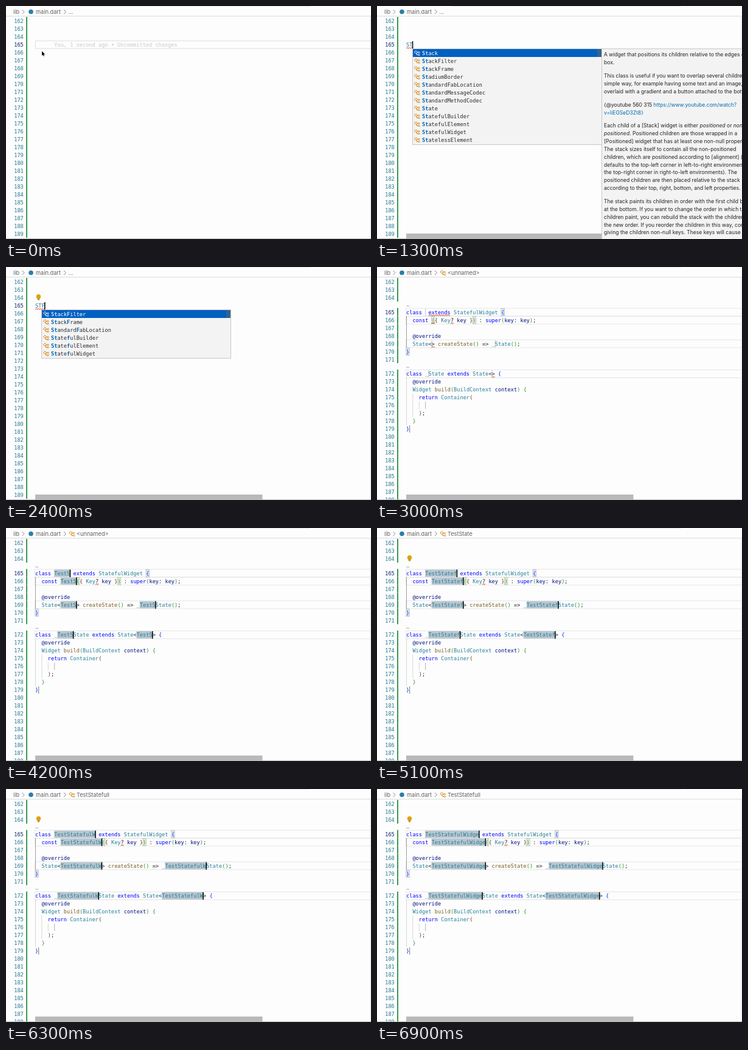
Write an HTML page with a canvas that moves like this. It is 600 px wide and 384 px high and loops after 7 s.

```html
<!DOCTYPE html>
<html lang="en">
<head>
<meta charset="utf-8">
<title>Stateful widget snippet</title>
<style>
html, body { margin: 0; width: 100%; height: 100%; overflow: hidden; background: #fdfdfd; }
canvas { display: block; }
</style>
</head>
<body>
<canvas id="stage" width="600" height="384"></canvas>
<script>
const ctx = document.getElementById('stage').getContext('2d');
const LOOP = 7000, LEFT = 48, CHAR = 5.207, ROW = 13, LENS = 10.5;
const MONO = '8.65px "DejaVu Sans Mono", monospace';
const UI = '9.2px Inter, sans-serif';
const DOC = '8.55px Inter, sans-serif';
const TYPE = '#267f99', RED = '#e51400', BORDER = '#e6e6e6';
const BRACKETS = ['#0431fa', '#319331', '#7b3814'];

// Moments in ms
const LIST = 700, DOCS = 1200, BULB = 1500, INSERT = 2600, OUTLINE = 2900;
const QUERY = [[500, 'S'], [1000, 'ST'], [2000, 'STF']];
// '<' deletes the previous letter
const KEYS = 'TestStatefull<Widge';
const KEY_TIMES = [3400, 3600, 3800, 3900, 4100, 4300, 4500, 4600, 4700, 4900,
  5200, 5400, 5700, 6000, 6200, 6400, 6500, 6700, 6850];
const CRUMBS = [[OUTLINE, '<unnamed>'], [4900, 'TestState'], [5900, 'TestStatefull']];

const CODE = `class $ extends StatefulWidget {
  const $({ Key? key }) : super(key: key);

  @override
  State<$> createState() => _$State();
}

class _$State extends State<$> {
  @override
  Widget build(BuildContext context) {
    return Container(

    );
  }
}`.split('\n');

const ITEMS = `Stack StackFilter StackFrame StadiumBorder StandardFabLocation
StandardMessageCodec StandardMethodCodec State StatefulBuilder StatefulElement
StatefulWidget StatelessElement`.split(/\s+/);

// *italic*, |link|
const PARAGRAPHS = `A widget that positions its children relative to the edges of its
box.

This class is useful if you want to overlap several children in a
simple way, for example having some text and an image,
overlaid with a gradient and a button attached to the bottom.

{@youtube 560 315 |https://www.youtube.com/watch?|
|v=liEGSeD3Zt8}|

Each child of a [Stack] widget is either *positioned* or *non-*
*positioned*. Positioned children are those wrapped in a
[Positioned] widget that has at least one non-null property.
The stack sizes itself to contain all the non-positioned
children, which are positioned according to [alignment] (which
defaults to the top-left corner in left-to-right environments and
the top-right corner in right-to-left environments). The
positioned children are then placed relative to the stack
according to their top, right, bottom, and left properties.

The stack paints its children in order with the first child being
at the bottom. If you want to change the order in which the
children paint, you can rebuild the stack with the children in
the new order. If you reorder the children in this way, consider
giving the children non-null keys. These keys will cause`.split('\n\n').map(p => p.split('\n'));

const latest = (steps, t) => steps.reduce((value, [at, v]) => t >= at ? v : value, '');
const colX = col => LEFT + col * CHAR;

function rect(x, y, w, h, color) {
  ctx.fillStyle = color;
  ctx.fillRect(x, y, w, h);
}

function frame(x, y, w, h, color) {
  ctx.strokeStyle = color;
  ctx.lineWidth = 1;
  ctx.strokeRect(x, y, w, h);
}

function text(str, x, y, color, font = MONO) {
  ctx.font = font;
  ctx.fillStyle = color;
  ctx.fillText(str, x, y + 3.1);
}

function line(points, color, width = 1) {
  ctx.beginPath();
  points.forEach(([x, y]) => ctx.lineTo(x, y));
  ctx.strokeStyle = color;
  ctx.lineWidth = width;
  ctx.stroke();
}

function disc(x, y, r, color) {
  ctx.beginPath();
  ctx.arc(x, y, r, 0, 7);
  ctx.fillStyle = color;
  ctx.fill();
}

function squiggle(x, y, w) {
  const points = [];
  for (let i = 0; i <= w; i += 1.7) points.push([x + i, y + 5.3 + (points.length % 2 ? -0.8 : 0.8)]);
  line(points, RED, 0.9);
}

function chevron(x) {
  line([[x, 6], [x + 3.5, 9.5], [x, 13]], '#767676', 0.9);
}

function diamond(x, y, r, color) {
  line([[x - r, y], [x, y - r], [x + r, y], [x, y + r], [x - r, y]], color, 1);
}

function classIcon(x, y, color = '#d67e00') {
  diamond(x + 3, y - 1.5, 2.5, color);
  diamond(x + 8, y - 1, 1.4, color);
  diamond(x + 8, y + 3, 1.4, color);
  line([[x + 5, y - 1], [x + 7, y - 1]], color);
  line([[x + 4.5, y], [x + 4.5, y + 3], [x + 7, y + 3]], color);
}

function bulb() {
  disc(53.5, 48.8, 3.7, '#dda20d');
  rect(51.8, 51, 3.4, 3.6, '#c99413');
}

function caret(x, y) {
  rect(x - 0.6, y - 6, 1.5, 12.5, '#000');
}

function pointer(x, y) {
  ctx.beginPath();
  [[0, 0], [0, 7.2], [1.7, 5.7], [2.8, 8.2], [4, 7.7], [2.9, 5.2], [5.2, 5.2]]
    .forEach(([dx, dy]) => ctx.lineTo(x + dx, y + dy));
  ctx.closePath();
  ctx.fillStyle = '#000';
  ctx.fill();
}

function breadcrumbs(t) {
  rect(122, 0, 378, 1, '#e9e9e9');
  rect(0, 16, 600, 1, '#e2e2e2');
  rect(0, 17, 600, 1, '#f3f3f3');
  text('lib', 12, 9.5, '#616161', UI);
  chevron(26.5);
  disc(41, 9.5, 3.8, '#2a7ea8');
  text('main.dart', 49, 9.5, '#616161', UI);
  chevron(95);
  const crumb = latest(CRUMBS, t);
  if (crumb) {
    classIcon(103.5, 9.5);
    text(crumb, 116, 9.5, '#616161', UI);
  } else {
    text('...', 102.5, 9.5, '#616161', UI);
  }
}

function rowY(n, inserted) {
  const lenses = inserted ? (n >= 165) + (n >= 172) : 0;
  return 25 + (n - 162) * ROW + lenses * LENS;
}

function gutter(inserted) {
  for (let n = 162; n < 190; n++) {
    const y = rowY(n, inserted);
    text(n, 13.2, y, n === 165 ? '#0b216f' : '#237893');
    rect(33, y - 7, 2, ROW, '#38994f');
  }
}

function tokenColor(token) {
  if (/^(class|extends|const|return|super)$/.test(token)) return '#0000ff';
  if (/^(createState|build)$/.test(token)) return '#795e26';
  if (/^[A-Z_]/.test(token)) return TYPE;
  return /^[@a-z]/.test(token) ? '#001080' : '#222';
}

function bracketBox(x, y, fill, edge) {
  rect(x, y - 6, CHAR, 12, fill);
  frame(x, y - 6, CHAR, 12, edge);
}

function guide(col, from, to, color) {
  const top = rowY(from, true) - 6.5;
  rect(colX(col), top, 1, rowY(to, true) + 6.5 - top, color);
}

function code(name) {
  [165, 172].forEach(n => text('…', LEFT, rowY(n, true) - 13, '#999'));
  [165, 166, 169, 172].forEach(n => frame(LEFT - 0.5, rowY(n, true) - 6.5, 560, ROW, BORDER));
  guide(0, 166, 169, '#a0a0a0');
  guide(0, 173, 178, '#d6d6d6');
  guide(2, 175, 177, '#d6d6d6');
  guide(4, 176, 176, '#d6d6d6');
  rect(colX(6), rowY(176, true) - 6, 1, 12, '#b0b0b0');

  let depth = 0;
  CODE.forEach((source, i) => {
    const n = 165 + i, y = rowY(n, true), carets = [];
    let col = 0;
    for (const token of source.match(/\$|@?\w+|\s+|[^\w\s$]/g) || []) {
      const x = colX(col);
      if (token === '$') {
        rect(x, y - 6, Math.max(1, name.length * CHAR), 12, '#b9c6d0');
        text(name, x, y, TYPE);
        col += name.length;
        if (name) carets.push(colX(col));
        continue;
      }
      let color = tokenColor(token);
      if (/[)}]/.test(token)) depth--;
      if (/[(){}]/.test(token)) color = BRACKETS[depth % 3];
      if ((n === 165 && token === '{') || n === 170) bracketBox(x, y, '#e6ebf5', '#b9bfcb');
      if (n === 166 && depth === 1 && /[()]/.test(token) && (col < 9 + name.length || col === 21 + name.length))
        bracketBox(x, y, '#e3eee0', '#b9c9b6');
      if (/[({]/.test(token)) depth++;
      text(token, x, y, color);
      col += token.length;
      if (token === '?') squiggle(x, y, CHAR);
      const missing = n === 165 && token === 'extends' || n === 166 && col === 9
        || (n === 169 || n === 172) && token === '>' && source[source.indexOf('>') - 1] === '$' && carets.length === 0;
      if (!name && missing && !(n === 169 && col > 10)) squiggle(x, y, token.length * CHAR);
    }
    carets.forEach(x => caret(x, y));
    if (n === 179) rect(colX(1), y - 6, 1, 12, '#777');
  });
}

// Positions of the query letters within the label, or null
function fuzzy(label, query) {
  const hits = [];
  let from = 0;
  for (const letter of query.toLowerCase()) {
    const at = label.toLowerCase().indexOf(letter, from);
    if (at < 0) return null;
    hits.push(at);
    from = at + 1;
  }
  return hits;
}

function suggestions(query) {
  const found = ITEMS.map(label => ({ label, hits: fuzzy(label, query) })).filter(item => item.hits);
  rect(58, 70.5, 311, found.length * ROW + 2, '#f3f3f3');
  frame(58.5, 70.5, 311, found.length * ROW + 2, '#c8c8c8');
  rect(59, 71, 310, ROW, '#0060c0');
  rect(362, 71, 7, ROW, 'rgba(100,100,100,.5)');
  found.forEach(({ label, hits }, i) => {
    const y = 77.5 + i * ROW, selected = i === 0;
    classIcon(61, y, selected ? '#fff' : '#d67e00');
    [...label].forEach((letter, j) => {
      const hit = hits.includes(j);
      const color = selected ? (hit ? '#bbe1ff' : '#fff') : (hit ? '#0066bf' : '#2b2b2b');
      text(letter, 74 + j * CHAR, y, color, (hit ? 'bold ' : '') + MONO);
    });
  });
}

function docs() {
  rect(369, 70.5, 231, 314, '#f3f3f3');
  frame(369.5, 70.5, 240, 330, '#c8c8c8');
  let y = 80.3;
  for (const lines of PARAGRAPHS) {
    for (const str of lines) {
      let x = 373, italic = false, link = false;
      for (const part of str.split(/([*|])/)) {
        if (part === '*') italic = !italic;
        else if (part === '|') link = !link;
        else {
          text(part, x, y, link ? '#006ab1' : '#222', (italic ? 'italic ' : '') + DOC);
          x += ctx.measureText(part).width;
        }
      }
      y += 12.85;
    }
    y += 9;
  }
}

function typedName(t) {
  let name = '';
  KEY_TIMES.forEach((at, i) => {
    if (t >= at) name = KEYS[i] === '<' ? name.slice(0, -1) : name + KEYS[i];
  });
  return name;
}

function emptyEditor(t) {
  const y = rowY(165), query = latest(QUERY, t);
  if (t < 900) frame(LEFT + 0.5, y - 6.5, 560, 12.5, '#dedede');
  if (!query) {
    text('You, 1 second ago • Uncommitted changes', colX(6), y, '#c9c9c9');
    pointer(59, 74.5);
    return;
  }
  text(query, LEFT, y, TYPE);
  if (t >= DOCS) squiggle(LEFT, y, query.length * CHAR);
  caret(colX(query.length), y);
  if (t >= BULB) bulb();
  if (t >= LIST) suggestions(query);
  if (t >= DOCS && query === 'ST') docs();
}

function draw(t) {
  const inserted = t >= INSERT;
  rect(0, 0, 600, 384, '#fdfdfd');
  gutter(inserted);
  if (t >= 200) rect(LEFT, 375, 373.5, 8, '#b9b9b9');
  rect(598.5, 18, 1, 366, '#e3e3e3');
  rect(0, 383, 600, 1, '#bdbdbd');
  if (inserted) {
    code(typedName(t));
    if (t >= 5000) bulb();
  } else {
    emptyEditor(t);
  }
  breadcrumbs(t);
}

function tick() {
  draw(performance.now() % LOOP);
  requestAnimationFrame(tick);
}
tick();
</script>
</body>
</html>
```
